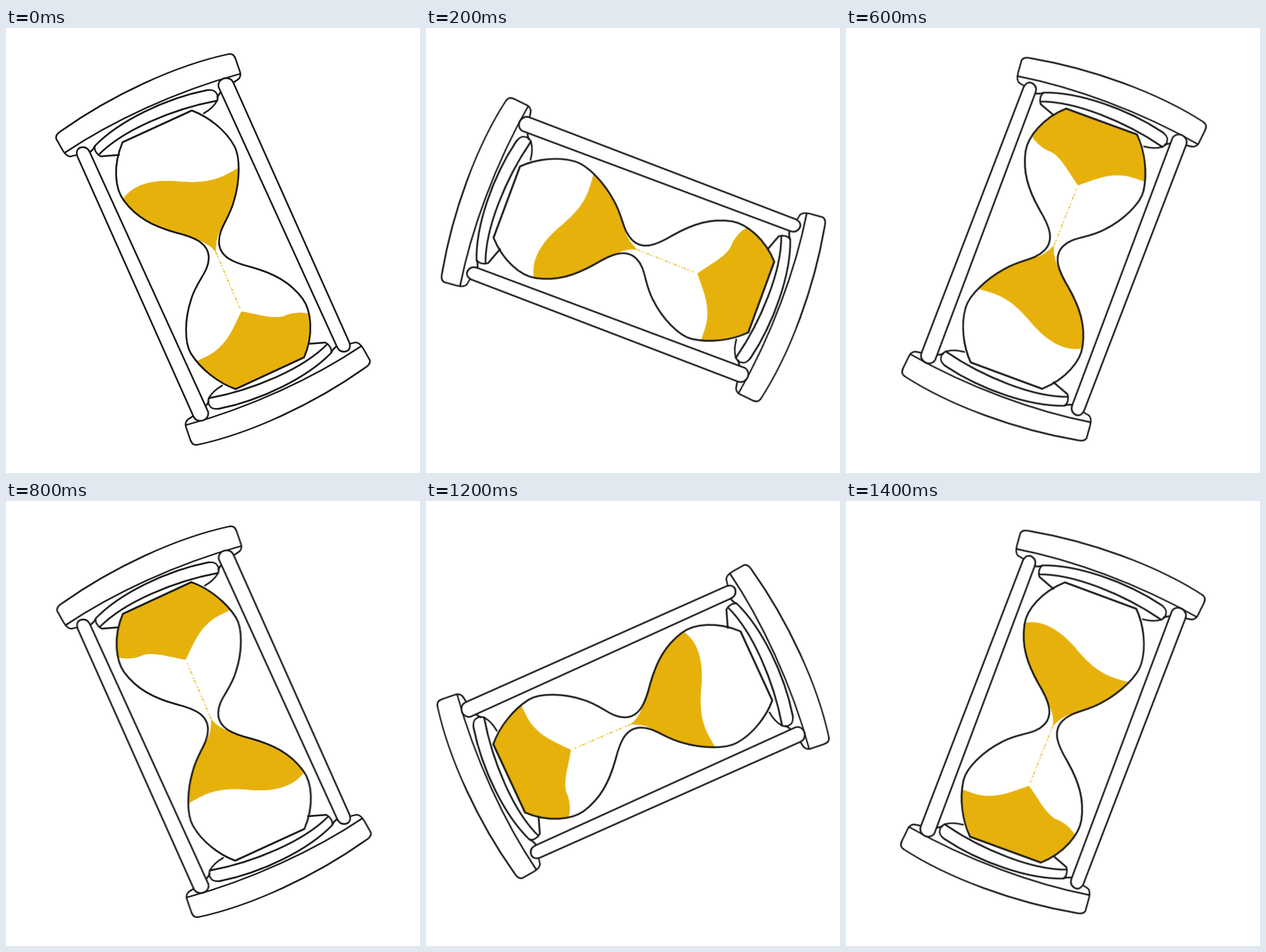
Write an HTML page that moves like this. It is 586x631 px and loops after 1600 ms.

```html
<!DOCTYPE html>
<html lang="en">
<head>
<meta charset="utf-8">
<title>Turning hourglass</title>
<style>
  html, body { margin: 0; width: 100%; height: 100%; overflow: hidden; background: #fff; }
  svg { display: block; width: 586px; height: 631px; }
  .turn {
    transform-origin: 293.7px 313.5px;
    animation: turn 1.6s steps(8, end) infinite;
  }
  @keyframes turn { to { transform: rotate(-360deg); } }
  .line { fill: none; stroke: #161616; stroke-width: 2.3; stroke-linejoin: round; stroke-linecap: round; }
  .rod { fill: #fff; }
  .glass { stroke-width: 2.5; }
  .sand { fill: #e6b10a; }
  .stream { fill: none; stroke: #e6b10a; stroke-width: 1.5; stroke-dasharray: 4 2 2 3 1 2; }
</style>
</head>
<body>
<svg viewBox="0 0 586 631">
  <defs>
    <!-- plate and inner disk; the other end is the same turned by 180 degrees -->
    <g id="cap">
      <path d="M322 77 C329 73 333 71 331.5 63 L325 44 C323 39 321 36 315 37 C240 53 150 95 78 146 C73 149 70 152 71 157 L80 173 Q86 183 92 182 L100 180"/>
      <path d="M83 177 C150 132 240 90 331 65"/>
      <path d="M160 180 L134 182 C128 179 124 172 126 167 C160 132 225 100 285 88 C293 87 297 89 300 97 L299 103 C295 110 289 116 280 121"/>
      <path d="M131 180 C165 145 235 115 299 103"/>
      <path d="M119 176 Q124 172 126 167 M303 92 L299 98"/>
    </g>
    <path id="rod" d="M101 182 C98 172 104 169 109 169 C114 169 117 172 119 177 L286 544 C288 552 281 557 275 557 C270 557 267 555 265 550 Z"/>
    <path id="glass" d="M165 162 C151 195 154 228 167 245 C185 269 208 281 240 290 C264 296 287 304 287 326 C287 346 270 358 262 385 C253 412 252 446 262 462 C276 484 300 503 325 512 L422 467 C436 434 432 401 420 384 C402 360 379 348 347 339 C323 333 301.5 325 301.5 303 C301.5 283 316 271 323 244 C331 217 332 183 323 167 C311 145 287 126 263 117 Z"/>
    <clipPath id="inside"><use href="#glass"/></clipPath>
  </defs>

  <g class="turn">
    <g class="line">
      <use href="#cap"/>
      <use href="#cap" transform="rotate(180 293 314)"/>
    </g>
    <g class="sand" clip-path="url(#inside)">
      <path d="M164 245 C178 222 205 215 240 217 C285 222 305 214 335 194 L335 245 L303 288 Q297 298 297 318 Q288 306 272 301 L240 300 L150 280 Z"/>
      <path d="M266 475 C280 466 290 465 302 453 C316 440 322 425 333 402 C350 404 375 413 392 409 C405 403 420 401 436 408 L445 475 L325 525 L255 485 Z"/>
    </g>
    <path class="stream" d="M297 318 L331 397"/>
    <use class="line glass" href="#glass"/>
    <g class="line rod">
      <use href="#rod"/>
      <use href="#rod" transform="rotate(180 293.5 314)"/>
    </g>
  </g>
</svg>
</body>
</html>
```
